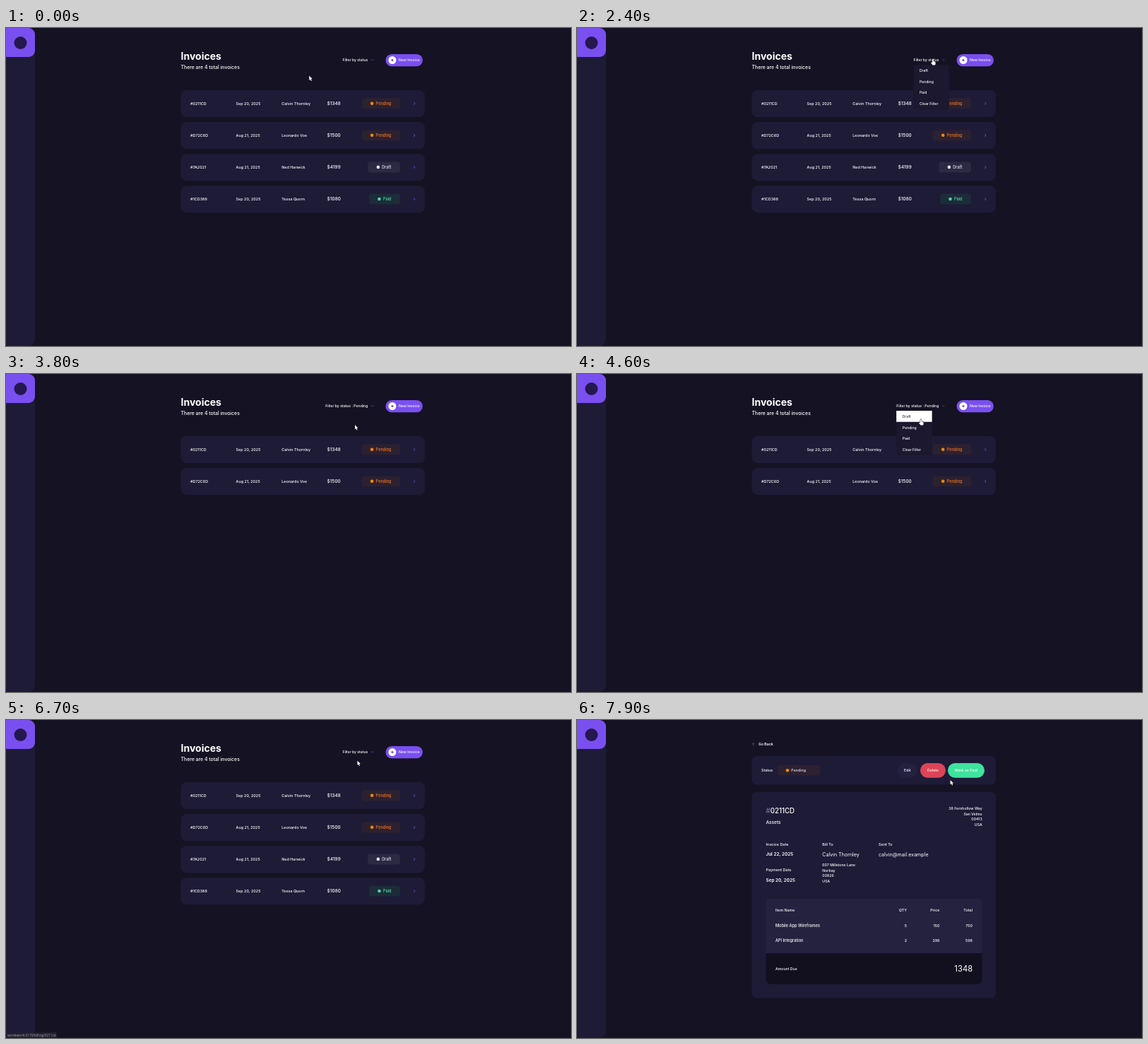
Write an HTML page with a canvas that moves like this. It is 800 by 450 pixels and loops after 8 s.

```html
<!DOCTYPE html>
<html lang="en">
<head>
<meta charset="utf-8">
<title>Invoices</title>
<style>
html, body { margin: 0; width: 100%; height: 100%; overflow: hidden; background: #151223; }
canvas { display: block; width: 800px; height: 450px; }
</style>
</head>
<body>
<canvas id="stage" width="800" height="450"></canvas>
<script>
const ctx = document.getElementById('stage').getContext('2d');
const LOOP = 8000, STEP = 100, TRAVEL = 400, CLICK_DELAY = 100, LINK_LINGER = 600;
const BG = '#151223', CARD = '#1e1b37', PURPLE = '#7a4ff0', WHITE = '#fff';
const LEFT = 247.5, WIDTH = 345.5, MENU_TOP = 52, MENU_WIDTH = 50.5, PITCH = 15.75, ROW_TOP = 88;

const invoices = [
  { id: '0211CD', date: 'Sep 20, 2025', name: 'Calvin Thornley', total: '$1348', status: 'Pending' },
  { id: 'D72C6D', date: 'Aug 21, 2025', name: 'Leonardo Voe', total: '$1500', status: 'Pending' },
  { id: '7A2021', date: 'Aug 21, 2025', name: 'Ned Harwick', total: '$4199', status: 'Draft' },
  { id: '1CD388', date: 'Sep 20, 2025', name: 'Tessa Quorn', total: '$1080', status: 'Paid' }
];
const chipColors = {
  Pending: { bg: '#2c2130', dot: '#f58a0a', ink: '#ee7423' },
  Draft: { bg: '#2c2a42', dot: '#dfe3fa', ink: '#dfe3fa' },
  Paid: { bg: '#1c2c39', dot: '#4fd6a4', ink: '#4fd6a4' }
};
const options = ['Draft', 'Pending', 'Paid', 'Clear Filter'];

// The pointer reaches each spot at its time, then clicks to change the state
const openMenu = { menu: true };
const pick = filter => ({ menu: false, filter });
const script = [
  { at: 0, x: 429.3, y: 67.6 },
  { at: 2300, x: 504, y: 44, then: openMenu },
  { at: 2800, x: 496, y: 59, then: pick('Draft') },
  { at: 3300, x: 495, y: 43, then: openMenu },
  { at: 3600, x: 494, y: 72, then: pick('Pending') },
  { at: 4350, x: 487, y: 43, then: openMenu },
  { at: 4900, x: 487, y: 91, then: pick('Paid') },
  { at: 5600, x: 481.5, y: 46.5, then: openMenu },
  { at: 6000, x: 485, y: 105, then: pick('') },
  { at: 6500, x: 497.5, y: 57.5 },
  { at: 7300, x: 529, y: 95, then: { detail: true } },
  { at: 7700, x: 528.6, y: 85 }
];

function stateAt(t) {
  const done = script.filter(step => t >= step.at + CLICK_DELAY).map(step => step.then);
  return Object.assign({ filter: '', menu: false, detail: false }, ...done);
}

function pointerAt(t) {
  let { x, y } = script[0], ready = 0;
  for (const step of script.slice(1)) {
    const start = Math.max(ready, step.at - TRAVEL);
    const p = Math.min(1, Math.max(0, (t - start) / (step.at - start)));
    const k = 1 - (1 - p) ** 2;
    x += (step.x - x) * k;
    y += (step.y - y) * k;
    ready = step.at + CLICK_DELAY;
  }
  return { x, y };
}

const visible = filter => invoices.filter(v => !filter || v.status === filter);

// The browser keeps showing a link for a moment after the pointer leaves it
function linkAt(t) {
  for (let past = t; past >= t - LINK_LINGER; past -= STEP) {
    const state = stateAt(past);
    if (!state.menu && pointerAt(past).y > ROW_TOP) return visible(state.filter)[0].id.toLowerCase();
  }
}

// Drawing helpers; text is placed by its vertical centre
function box(x, y, w, h, r, fill) {
  ctx.fillStyle = fill;
  ctx.beginPath();
  ctx.roundRect(x, y, w, h, r);
  ctx.fill();
}

function disc(x, y, r, fill) {
  box(x - r, y - r, r * 2, r * 2, r, fill);
}

function text(str, x, y, size, { ink = WHITE, weight = 500, align = 'left', family = 'Inter' } = {}) {
  ctx.font = `${weight} ${size}px ${family}, sans-serif`;
  ctx.fillStyle = ink;
  ctx.textAlign = align;
  ctx.fillText(str, x, y + size * 0.36);
  return ctx.measureText(str).width;
}

function line(points, stroke, width = 0.9) {
  ctx.strokeStyle = stroke;
  ctx.lineWidth = width;
  ctx.beginPath();
  points.forEach(([x, y]) => ctx.lineTo(x, y));
  ctx.stroke();
}

function chevron(x, y, angle, stroke, size = 1.7) {
  ctx.save();
  ctx.translate(x, y);
  ctx.rotate(angle);
  line([[-size / 2, -size], [size / 2, 0], [-size / 2, size]], stroke);
  ctx.restore();
}

function button(label, x, w, fill) {
  box(x, 61, w, 20.7, 10.3, fill);
  text(label, x + w / 2, 71.2, 5.2, { align: 'center' });
}

function sidebar() {
  box(0, 0, 41, 450, [0, 9, 9, 0], CARD);
  box(0, 0, 41, 41, [0, 9, 9, 0], PURPLE);
  disc(20.5, 21, 9, '#24184f');
}

function statusChip(status, right, mid) {
  const { bg, dot, ink } = chipColors[status];
  ctx.font = '500 5.6px Inter, sans-serif';
  const w = ctx.measureText(status).width + 32.5;
  const x = right - w;
  box(x, mid - 7.3, w, 15, 4, bg);
  disc(x + 14.6, mid + 0.1, 2.3, dot);
  text(status, x + 20, mid, 5.6, { ink });
}

function row(invoice, index) {
  const y = ROW_TOP + index * 45.1, mid = y + 18.6;
  box(LEFT, y, WIDTH, 38, 8, CARD);
  ['#' + invoice.id, invoice.date, invoice.name, invoice.total].forEach((str, i) =>
    text(str, 261 + i * 64.6, mid, i === 3 ? 6.4 : 5.45));
  statusChip(invoice.status, 558, mid);
  chevron(578.2, mid + 0.3, 0, PURPLE);
}

function menu(left, hoverY) {
  box(left, MENU_TOP, MENU_WIDTH, PITCH * options.length, 4, '#1b1830');
  const hoverIndex = Math.floor((hoverY - MENU_TOP) / PITCH);
  options.forEach((label, i) => {
    const top = MENU_TOP + i * PITCH, hovered = i === hoverIndex;
    if (hovered) box(left, top, MENU_WIDTH, PITCH, 0, WHITE);
    text(label, left + 8.5, top + 8, 5.1, { ink: hovered ? '#3a3848' : WHITE });
  });
}

function listPage(state, hoverY) {
  const { filter } = state;
  text('Invoices', LEFT, 40, 14, { weight: 700 });
  text('There are 4 total invoices', LEFT, 55.2, 6.9);
  const label = 'Filter by status' + (filter && ' : ' + filter);
  const labelLeft = 512.3 - text(label, 512.3, 45.2, 5.1, { align: 'right' });
  chevron(518.8, 45.2, Math.PI / 2, '#6646c8', 1.5);

  box(537.5, 37, 52.5, 17.2, 8.6, PURPLE);
  disc(547, 45.5, 5.5, WHITE);
  line([[545.3, 45.5], [548.7, 45.5]], '#49309a', 1);
  line([[547, 43.8], [547, 47.2]], '#49309a', 1);
  text('New Invoice', 556, 45.3, 5.1);

  visible(filter).forEach(row);
  if (state.menu) menu(labelLeft, hoverY);
}

function address(lines, x, y, align) {
  lines.forEach((str, i) => text(str, x, y + i * 7.5, 5.2, { align }));
}

function field(label, value, x, y, weight) {
  text(label, x, y, 5.4);
  text(value, x, y + 13.9, weight > 500 ? 6.4 : 7.1, { weight });
}

function detailPage() {
  chevron(249.4, 34, Math.PI, '#8a7ad0');
  text('Go Back', 257, 33.8, 5.2, { weight: 600 });

  box(LEFT, 51, WIDTH, 40.5, 7, CARD);
  text('Status', 261, 71.2, 5.3);
  box(283.5, 64, 60.5, 14.5, 4, chipColors.Pending.bg);
  disc(298, 71.3, 2.3, chipColors.Pending.dot);
  text('Pending', 303.3, 71.2, 5.3, { ink: '#e8dfe6' });
  button('Edit', 454, 27.5, '#232040');
  button('Delete', 486, 36, '#dc4457');
  button('Mark as Paid', 525, 52, '#3ee39d');

  box(LEFT, 102, WIDTH, 291.5, 7, CARD);
  const hash = text('#', 267.5, 129, 9.7, { ink: '#777592' });
  text('0211CD', 267.5 + hash, 129, 9.7);
  text('Assets', 267.5, 145, 6.5);
  address(['38 Fernhollow Way', 'San Velmo', '00413', 'USA'], 573.7, 125.5, 'right');

  field('Invoice Date', 'Jul 22, 2025', 267.5, 176.2, 600);
  field('Payment Date', 'Sep 20, 2025', 267.5, 212.4, 600);
  field('Bill To', 'Calvin Thornley', 347.3, 176.2, 400);
  field('Sent To', 'calvin@mail.example', 427, 176.2, 400);
  address(['607 Millstone Lane', 'Norbay', '00826', 'USA'], 347.3, 205.3, 'left');

  box(267.5, 253, 306, 77.5, [5, 5, 0, 0], '#252240');
  box(267.5, 330, 306, 44, [0, 0, 7, 7], '#12101f');
  [['Item Name', 'QTY', 'Price', 'Total'],
   ['Mobile App Wireframes', '5', '150', '750'],
   ['API Integration', '2', '299', '598']].forEach(([item, ...cells], i) => {
    const y = 269.5 + i * 21.4;
    text(item, 281, y, i ? 5.6 : 5.3);
    cells.forEach((cell, c) => text(cell, 467 + c * 46.5, y, 5.4, { align: 'right' }));
  });
  text('Amount Due', 281, 352, 5.2);
  text('1348', 560.2, 351.8, 11.3, { align: 'right', weight: 400 });
}

function linkBar(id) {
  box(0, 442, 72, 8, [0, 2, 0, 0], '#211f2d');
  text('workbench:3170/billing/' + id, 2, 446, 4.7, { ink: '#a9a7b4', weight: 400, family: 'Open Sans' });
}

function arrow(x, y) {
  ctx.beginPath();
  [[0, 0], [0, 6.3], [1.4, 5.1], [2.5, 7.5], [3.6, 7], [2.6, 4.7], [4.5, 4.5]]
    .forEach(([dx, dy]) => ctx.lineTo(x + dx, y + dy));
  ctx.closePath();
  ctx.strokeStyle = '#0b0a12';
  ctx.lineWidth = 0.8;
  ctx.stroke();
  ctx.fillStyle = WHITE;
  ctx.fill();
}

function hand(x, y) {
  for (const [grow, fill] of [[0.4, '#0b0a12'], [0, WHITE]]) {
    const part = (dx, dy, w, h, r) =>
      box(x + dx - grow, y + dy - grow, w + grow * 2, h + grow * 2, r, fill);
    part(-0.8, -0.2, 1.6, 6, 0.8);
    part(-1.4, 3.2, 5, 5.4, 1.5);
    part(-2.7, 4.8, 2.4, 1.8, 0.9);
  }
}

function draw(t) {
  const state = stateAt(t), { x, y } = pointerAt(t);
  ctx.fillStyle = BG;
  ctx.fillRect(0, 0, 800, 450);
  sidebar();
  if (state.detail) detailPage();
  else listPage(state, y);
  const link = !state.detail && linkAt(t);
  if (link) linkBar(link);
  const onLabel = y > 40 && y < 50;
  const clickable = !state.detail && (onLabel || y > ROW_TOP || state.menu);
  (clickable ? hand : arrow)(x, y);
}

function tick() {
  const t = performance.now() % LOOP;
  draw(Math.floor(t / STEP) * STEP);
  requestAnimationFrame(tick);
}
tick();
</script>
</body>
</html>
```
